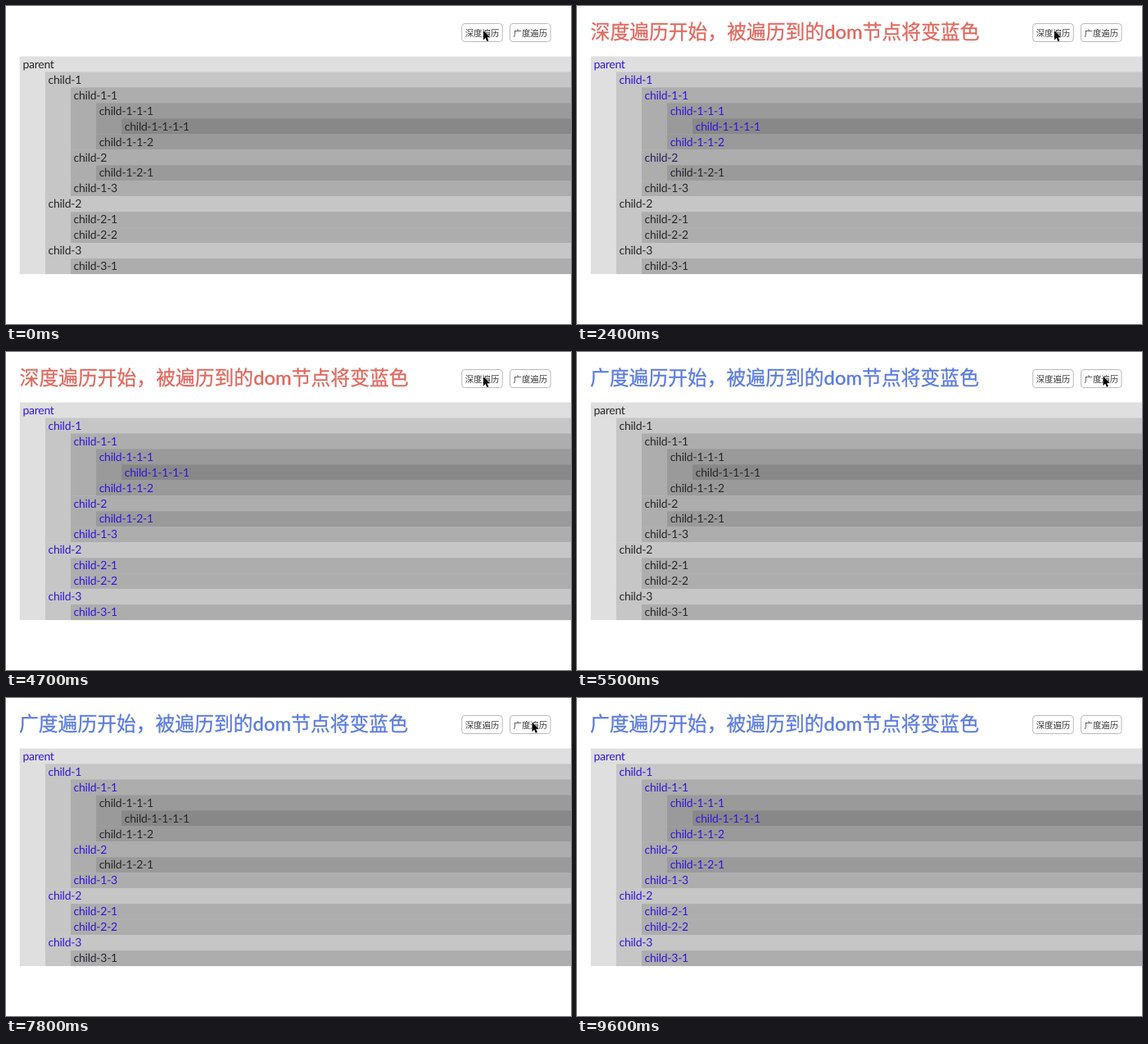
These frames come from a looping animation (690 by 388 pixels, 10 s). An HTML page:

```html
<!DOCTYPE html>
<html lang="zh-CN">
<head>
<meta charset="utf-8">
<title>DOM 遍历</title>
<style>
  html, body { margin: 0; width: 100%; height: 100%; overflow: hidden; background: #fff; }
  svg { display: block; width: 690px; height: 388px; }
  .node { font: 14px Lato, "Open Sans", sans-serif; letter-spacing: -0.25px; text-rendering: geometricPrecision; }
  .title { font: 500 23.8px Lato, "Noto Sans CJK SC", "Noto Sans CJK", sans-serif; stroke-width: 0.3px; }
  .button rect { fill: #fff; stroke: #bababa; }
  .button text { font: 10.4px "Noto Sans CJK SC", "Noto Sans CJK", sans-serif; fill: #3c3c3c; text-anchor: middle; }
</style>
</head>
<body>
<svg viewBox="0 0 690 388"></svg>
<script>
const LOOP = 10000, TICK = 100, STEP = 250, FADE = 500;
const ROW = 18.97, TOP = 61.5, LEFT = 16.8, INDENT = 31.1;
const SHADES = ['#dfdfdf', '#c6c6c6', '#adadad', '#9a9a9a', '#888888'];
const INK = [40, 40, 40], VISITED = [50, 24, 218];

// depth and label, in document order
const nodes = [
  [0, 'parent'], [1, 'child-1'], [2, 'child-1-1'], [3, 'child-1-1-1'],
  [4, 'child-1-1-1-1'], [3, 'child-1-1-2'], [2, 'child-2'], [3, 'child-1-2-1'],
  [2, 'child-1-3'], [1, 'child-2'], [2, 'child-2-1'], [2, 'child-2-2'],
  [1, 'child-3'], [2, 'child-3-1']
].map(([depth, label]) => ({ depth, label }));

const runs = [
  { from: 0, to: 5000, show: 500, first: 800, order: nodes,
    title: '深度遍历开始，被遍历到的dom节点将变蓝色', x: 16.6, color: '#e0695f', tip: [583, 30] },
  { from: 5000, to: LOOP, show: 5500, first: 5505,
    order: [...nodes].sort((a, b) => a.depth - b.depth),
    title: '广度遍历开始，被遍历到的dom节点将变蓝色', x: 16, color: '#5b7ce0', tip: [642.5, 29.5] }
];
const CURSOR_OUT = 9300;

const svg = document.querySelector('svg');
function add(name, attrs, parent = svg, text = '') {
  const el = document.createElementNS(svg.namespaceURI, name);
  for (const key in attrs) el.setAttribute(key, attrs[key]);
  el.textContent = text;
  parent.append(el);
  return el;
}

nodes.forEach((node, i) => {
  // a block reaches down to its last descendant
  let end = i + 1;
  while (end < nodes.length && nodes[end].depth > node.depth) end++;
  const x = LEFT + INDENT * node.depth, y = TOP + ROW * i;
  add('rect', { x, y, width: 690 - x, height: ROW * (end - i), fill: SHADES[node.depth] });
});
nodes.forEach((node, i) => {
  node.el = add('text', {
    class: 'node', x: LEFT + INDENT * node.depth + 3.6, y: TOP + ROW * i + 14.2
  }, svg, node.label);
});

function button(x, label) {
  const g = add('g', { class: 'button' });
  add('rect', { x, y: 21.5, width: 49.5, height: 22, rx: 3.5 }, g);
  add('text', { x: x + 24.8, y: 36.8 }, g, label);
}
button(556.7, '深度遍历');
button(615.5, '广度遍历');

const title = add('text', { class: 'title', y: 40.3 });
const cursor = add('path', {
  d: 'M0 0V11.4L2.6 9L4.4 13.2L6.4 12.3L4.6 8.3H8.2Z',
  fill: '#000', stroke: '#fff', 'stroke-width': 0.9, 'paint-order': 'stroke'
});

// the CSS "ease" curve, cubic-bezier(.25, .1, .25, 1)
function ease(x) {
  if (x <= 0) return 0;
  if (x >= 1) return 1;
  let lo = 0, hi = 1;
  for (let i = 0; i < 20; i++) {
    const u = (lo + hi) / 2;
    if (0.75 * u * (1 - u) + u ** 3 < x) lo = u; else hi = u;
  }
  return 0.3 * lo * (1 - lo) ** 2 + 3 * lo ** 2 * (1 - lo) + lo ** 3;
}
const mix = p => `rgb(${INK.map((c, i) => Math.round(c + (VISITED[i] - c) * p))})`;

function draw(t) {
  const run = runs.find(r => t >= r.from && t < r.to);
  title.textContent = t >= run.show ? run.title : '';
  title.setAttribute('x', run.x);
  title.setAttribute('fill', run.color);
  title.setAttribute('stroke', run.color);
  cursor.setAttribute('transform', `translate(${run.tip})`);
  cursor.setAttribute('visibility', t < CURSOR_OUT ? 'visible' : 'hidden');
  run.order.forEach((node, i) => {
    node.el.setAttribute('fill', mix(ease((t - run.first - STEP * i) / FADE)));
  });
}

const start = performance.now();
function frame() {
  const t = (performance.now() - start) % LOOP;
  draw(Math.floor(t / TICK) * TICK);
  requestAnimationFrame(frame);
}
frame();
</script>
</body>
</html>
```
